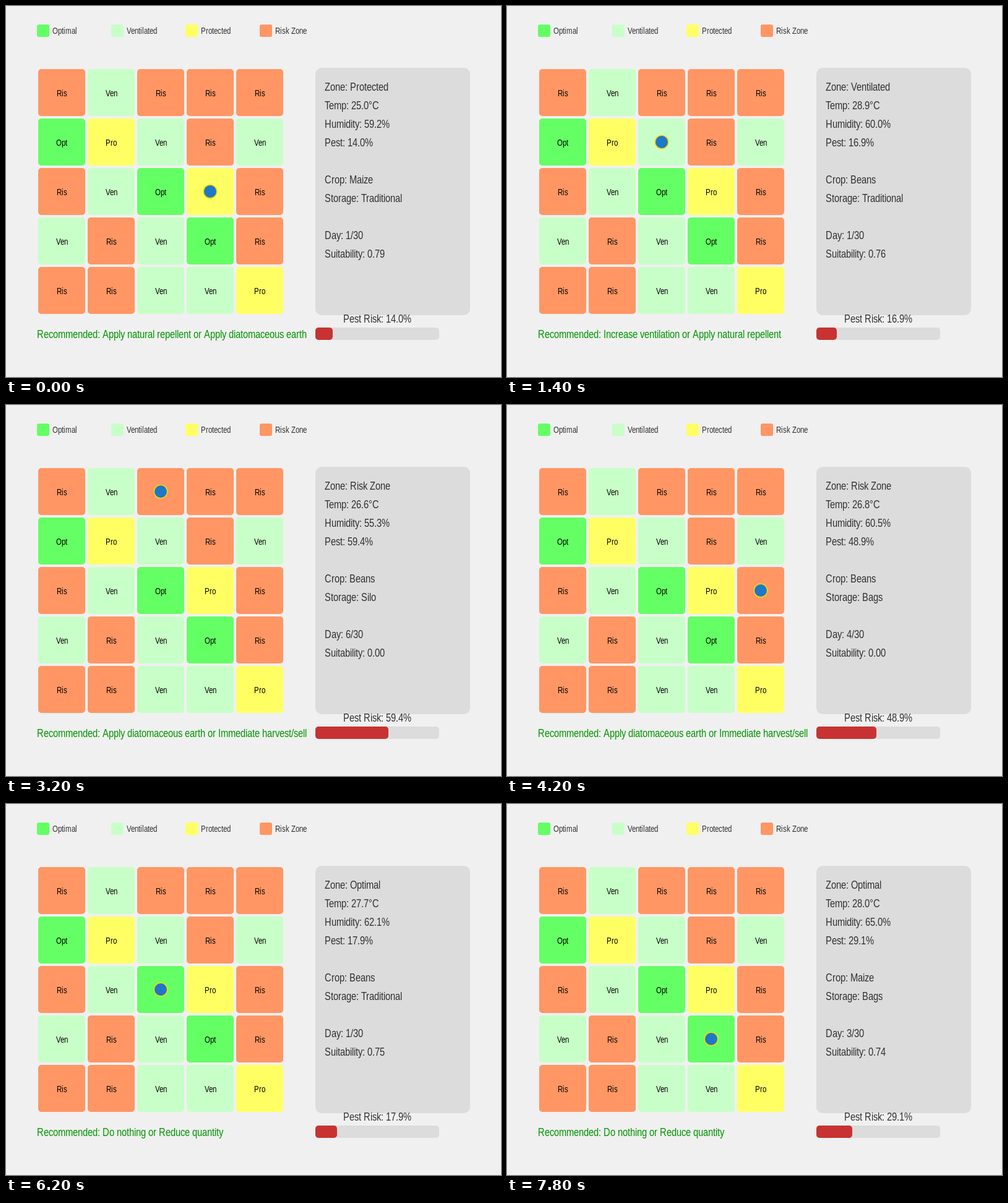
An HTML page that plays this animation: 800x600 px, repeating every 8000 ms.

```html
<!DOCTYPE html>
<html lang="en">
<head>
<meta charset="utf-8">
<title>Storage zones</title>
<style>
  html, body { margin: 0; width: 100%; height: 100%; overflow: hidden; background: #f0f0f0; }
  svg { display: block; width: 800px; height: 600px; }
  text { font-family: "Liberation Sans", Arial, sans-serif; white-space: pre; }
</style>
</head>
<body>
<svg id="stage" viewBox="0 0 800 600"></svg>
<script>
const STEP = 200, LOOP = 8000;
const CONDENSED = 0.82; // one narrow face for all text
const LARGE = 18, SMALL = 14;
const DARK = '#323232', GRAY = '#dcdcdc';

const ZONES = {
  O: { name: 'Optimal', color: '#64ff64', advice: 'Do nothing or Reduce quantity' },
  V: { name: 'Ventilated', color: '#c8ffc8', advice: 'Increase ventilation or Apply natural repellent' },
  P: { name: 'Protected', color: '#ffff64', advice: 'Apply natural repellent or Apply diatomaceous earth' },
  R: { name: 'Risk Zone', color: '#ff9664', advice: 'Apply diatomaceous earth or Immediate harvest/sell' }
};
const GRID = ['RVRRR', 'OPVRV', 'RVOPR', 'VRVOR', 'RRVVP'];

// Each season is known on one day; the other days follow from the rules in conditions().
const season = (start, crop, storage, day, column, row, temp, humidity, pest) =>
  ({ start, crop, storage, day, column, row, temp, humidity, pest });
const SEASONS = [
  season(0, 'Maize', 'Traditional', 1, 3, 2, 25, 59.2, 14),
  season(7, 'Beans', 'Traditional', 1, 2, 1, 28.9, 60, 16.9),
  season(11, 'Beans', 'Silo', 6, 2, 0, 26.6, 55.3, 59.4),
  season(18, 'Beans', 'Bags', 4, 4, 2, 26.8, 60.5, 48.9),
  season(26, 'Maize', 'Silo', 3, 3, 1, 26.5, 60, 55.5),
  season(31, 'Beans', 'Traditional', 1, 2, 2, 27.7, 62.1, 17.9),
  season(37, 'Maize', 'Bags', 3, 3, 3, 28, 65, 29.1)
];

const clampCell = n => Math.max(0, Math.min(4, n));

function conditions(known, day) {
  const d = day - known.day;
  return {
    column: clampCell(known.column + Math.round(Math.sin(d * Math.PI / 2))),
    row: clampCell(known.row + Math.round(d / 4)),
    temp: known.temp - 1.325 * d,
    humidity: known.humidity - 2.4 * d,
    pest: Math.min(100, known.pest * 1.23 ** d)
  };
}

const stage = document.getElementById('stage');
const ruler = document.createElement('canvas').getContext('2d');
ruler.font = '100px "Liberation Sans", Arial, sans-serif';
const widthOf = string => ruler.measureText(string).width / 100;

function add(tag, attributes) {
  const node = document.createElementNS('http://www.w3.org/2000/svg', tag);
  for (const key in attributes) node.setAttribute(key, attributes[key]);
  return stage.appendChild(node);
}
const box = (x, y, width, height, rx, fill) => add('rect', { x, y, width, height, rx, fill });

// Returns a setter; glyphs advance by whole pixels, kerning included.
function label(x, y, size, { centered = false, fill = DARK } = {}) {
  const node = add('text', { 'font-size': size, fill });
  return content => {
    let width = 0;
    const offsets = [...content].map((char, i) => {
      const next = content[i + 1] || '';
      const offset = width;
      width += Math.round((widthOf(char + next) - widthOf(next)) * size * CONDENSED);
      return offset / CONDENSED;
    });
    const left = centered ? x - Math.floor(width / 2) : x;
    node.setAttribute('transform', `translate(${left} ${y}) scale(${CONDENSED} 1)`);
    node.setAttribute('x', offsets.join(' '));
    node.textContent = content;
  };
}

Object.values(ZONES).forEach((zone, i) => {
  box(50 + 120 * i, 30, 20, 20, 3, zone.color);
  label(75 + 120 * i, 45, SMALL)(zone.name);
});

GRID.forEach((row, r) => [...row].forEach((key, c) => {
  const x = 50 + 80 * c, y = 100 + 80 * r;
  box(x + 2, y + 2, 76, 76, 5, ZONES[key].color);
  label(x + 40, y + 46, SMALL, { centered: true, fill: '#000' })(ZONES[key].name.slice(0, 3));
}));

box(500, 100, 250, 400, 10, GRAY);
box(500, 520, 200, 20, 5, GRAY);
const bar = box(500, 520, 0, 20, 5, '#c83232');
const setLines = Array.from({ length: 10 }, (_, i) => label(515, 137 + 30 * i, LARGE));
const setRisk = label(600, 512, LARGE, { centered: true });
const setAdvice = label(50, 537, LARGE, { fill: '#009600' });
const marker = [
  add('circle', { r: 11.5, fill: '#ffd700' }),
  add('circle', { r: 10, fill: '#1e78c8' })
];

function show(tick) {
  const current = SEASONS.findLast(s => s.start <= tick);
  const day = tick - current.start + 1;
  const { column, row, temp, humidity, pest } = conditions(current, day);
  const zone = ZONES[GRID[row][column]];
  const suitability = pest > 40 ? 0 : Math.max(0.74, 0.93 - pest / 100);

  [
    `Zone: ${zone.name}`,
    `Temp: ${temp.toFixed(1)}°C`,
    `Humidity: ${humidity.toFixed(1)}%`,
    `Pest: ${pest.toFixed(1)}%`,
    '',
    `Crop: ${current.crop}`,
    `Storage: ${current.storage}`,
    '',
    `Day: ${day}/30`,
    `Suitability: ${suitability.toFixed(2)}`
  ].forEach((content, i) => setLines[i](content));

  setRisk(`Pest Risk: ${pest.toFixed(1)}%`);
  setAdvice(`Recommended: ${zone.advice}`);
  bar.setAttribute('width', Math.floor(pest * 2));
  for (const circle of marker) {
    circle.setAttribute('cx', 90 + 80 * column);
    circle.setAttribute('cy', 140 + 80 * row);
  }
}

const origin = performance.now();
let shown = -1;
function frame() {
  const tick = Math.floor(((performance.now() - origin) % LOOP) / STEP);
  if (tick !== shown) show(shown = tick);
  requestAnimationFrame(frame);
}
frame();
</script>
</body>
</html>
```
